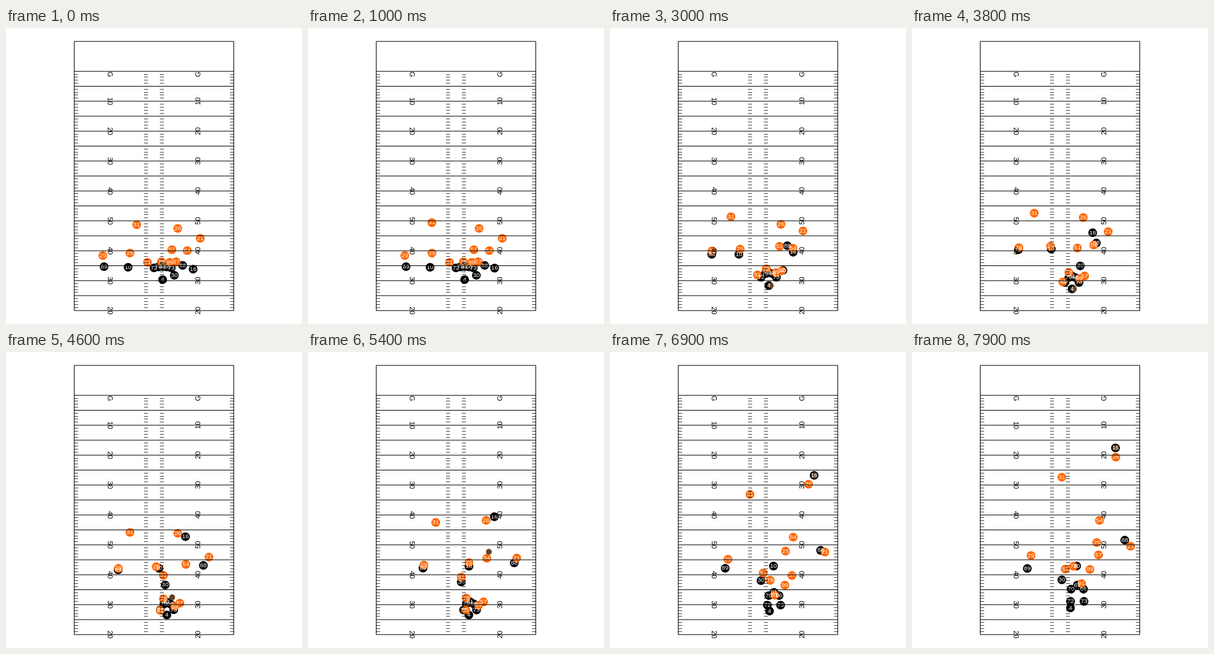
Animation of 480x480 px, one loop 8000 ms. Source, as an HTML page:

```html
<!DOCTYPE html>
<html lang="en">
<head>
<meta charset="utf-8">
<title>Play diagram</title>
<style>
  html, body { margin: 0; width: 100%; height: 100%; overflow: hidden; background: #fff; }
  svg { display: block; width: 100%; height: 100%; }
  text { font-family: "Liberation Sans", Arial, sans-serif; text-anchor: middle; }
  #lines { stroke: #000; stroke-width: 1.07; }
  #ticks { font-size: 11.04px; }
  #yards { font-size: 11.38px; }
  #numbers { font-size: 9.96px; fill: #fff; }
</style>
</head>
<body>
<svg viewBox="0 0 480 480">
  <g id="dots"></g>
  <g id="numbers"></g>
  <g id="ticks"></g>
  <g id="lines"></g>
  <g id="yards"></g>
</svg>
<script>
// The field is 90 by 53 1/3 yards, centred with a 5% margin.
const YARD = 480 / 1.1 / 90;
const TOP = 240 - 45 * YARD, BOTTOM = 240 + 45 * YARD, GOAL = TOP + 10 * YARD;
const LEFT = 240 - 80 / 3 * YARD, RIGHT = 240 + 80 / 3 * YARD;
const ORANGE = '#ff6600', BLACK = '#000', BROWN = '#654321';

// Times count steps of a tenth of a second.
const STEP = 100, STEPS = 80;
const HIKE = 14, CAUGHT = 19, THROW = 43, CATCH = 66;
const POCKET = [16, 50, 79], ROUTE = [16, 30, 54, 79], DEEP = [0, 19, 46, 69, 79];

const movers = [];

function add(layer, tag, attrs, label) {
  const el = document.createElementNS('http://www.w3.org/2000/svg', tag);
  for (const key in attrs) el.setAttribute(key, attrs[key]);
  if (label !== undefined) el.textContent = label;
  return document.getElementById(layer).appendChild(el);
}

const line = (x1, y1, x2, y2) => add('lines', 'line', { x1, y1, x2, y2 });

function drawTicks(y) {
  const inner = 3.3 * YARD;
  for (const x of [LEFT, 240 - inner]) add('ticks', 'text', { x, y: y - 1.6, style: 'text-anchor: start' }, '_');
  for (const x of [240 + inner, RIGHT]) add('ticks', 'text', { x, y: y - 1.6, style: 'text-anchor: end' }, '_');
}

function drawField() {
  line(LEFT, TOP, RIGHT, TOP);
  line(LEFT, TOP, LEFT, BOTTOM);
  line(RIGHT, TOP, RIGHT, BOTTOM);
  for (let yard = 0; yard <= 80; yard++) {
    const y = GOAL + yard * YARD;
    if (yard % 5) drawTicks(y);
    else line(LEFT, y, RIGHT, y);
    if (yard % 10) continue;
    const label = yard ? 50 - Math.abs(50 - yard) : 'G';
    const mid = yard ? y : y + YARD;
    for (const [x, turn] of [[LEFT + 12 * YARD, 90], [RIGHT - 12 * YARD, -90]]) {
      add('yards', 'text', { transform: `translate(${x} ${mid}) rotate(${turn})`, y: 4.07 }, label);
    }
  }
}

// Monotone cubic through the values v at the times t, held before the first.
function spline(t, v) {
  const slope = v.slice(1).map((b, i) => (b - v[i]) / (t[i + 1] - t[i]));
  const last = slope.length - 1;
  const tangent = v.map((_, i) => {
    if (i === 0) return slope[0];
    if (i > last) return slope[last];
    const a = slope[i - 1], b = slope[i];
    return a * b <= 0 ? 0 : 2 * a * b / (a + b);
  });
  return time => {
    if (time <= t[0]) return v[0];
    let i = 0;
    while (i < last && time > t[i + 1]) i++;
    const h = t[i + 1] - t[i], u = (time - t[i]) / h, w = 1 - u;
    return v[i] * (1 + 2 * u) * w * w + v[i + 1] * u * u * (3 - 2 * u)
      + h * u * w * (tangent[i] * w - tangent[i + 1] * u);
  };
}

function mover(color, r, position, label) {
  const parts = [add('dots', 'circle', { r, fill: color })];
  if (label) parts.push(add('numbers', 'text', { y: 2.6 }, label));
  movers.push({ parts, position });
  return position;
}

function player(color, number, times, ...points) {
  const x = spline(times, points.map(p => p[0]));
  const y = spline(times, points.map(p => p[1]));
  return mover(color, 7.1, time => [x(time), y(time)], number);
}

// The offensive line sets up straight, bends into a pocket, then opens upfield.
[72, 70, 61, 66, 73].forEach((number, i) => {
  const d = i - 2;
  player(BLACK, number, POCKET,
    [254 + 7 * d, 387 + d * d / 2],
    [262 + 5.3 * d, 406 + 3.2 * d * d],
    [268 + 12 * Math.sin(d), 378 + 6.6 * d * d]);
});

const passer = player(BLACK, 4, POCKET, [254, 408], [261, 427], [257, 415]);
const receiver = player(BLACK, 16, DEEP, [303.5, 391], [301.5, 387], [291, 299.5], [331, 200], [330, 155.5]);
player(BLACK, 89, ROUTE, [159, 387], [165, 367], [186.5, 350.5], [187, 351]);
player(BLACK, 10, ROUTE, [198, 388], [209, 367], [261, 347.5], [267, 347]);
player(BLACK, 88, ROUTE, [286.5, 385], [287.5, 353], [334.5, 342], [345, 305]);
player(BLACK, 30, ROUTE, [273, 401], [280.5, 393], [248.5, 373], [243, 369.5]);

player(ORANGE, 91, POCKET, [229.5, 380], [253, 420], [275, 375.5]);
player(ORANGE, 78, POCKET, [252, 379], [256, 401], [262, 347.5]);
player(ORANGE, 99, POCKET, [265.5, 380], [275, 413], [288.5, 352.5]);
player(ORANGE, 57, POCKET, [276, 379], [283, 408], [302.5, 329]);
player(ORANGE, 31, DEEP, [212, 319], [195, 312], [201, 292.5], [227, 231], [243, 203]);
player(ORANGE, 26, DEEP, [278.5, 325], [277, 325], [278.5, 294], [322, 214.5], [330.5, 170.5]);
player(ORANGE, 21, ROUTE, [315, 341], [313, 329], [338.5, 334], [354.5, 315]);
player(ORANGE, 29, ROUTE, [157, 369], [165.5, 361.5], [188, 345.5], [193, 330]);
player(ORANGE, 25, ROUTE, [201, 365], [211, 358.5], [261, 341.5], [299.5, 309]);
player(ORANGE, 51, ROUTE, [269, 359.5], [275, 354], [248.5, 365], [248.5, 352]);
player(ORANGE, 54, ROUTE, [294, 361], [296.5, 357], [290, 334.5], [304, 273]);

function fly(from, to, start, end, time) {
  const u = (time - start) / (end - start);
  return from.map((a, i) => a + (to[i] - a) * u);
}

// Ball: snapped to the passer, carried, thrown straight to the receiver.
function ball(time) {
  const spot = [254, 384];
  if (time < HIKE) return spot;
  if (time < CAUGHT) return fly(spot, passer(CAUGHT), HIKE, CAUGHT, time);
  if (time < THROW) {
    const [x, y] = passer(time);
    return [x + 3, y];
  }
  if (time < CATCH) return fly(passer(THROW), receiver(CATCH), THROW, CATCH, time);
  return receiver(time);
}
mover(BROWN, 4.8, ball);

function draw(now) {
  const time = Math.floor(now / STEP) % STEPS;
  for (const { parts, position } of movers) {
    const [x, y] = position(time);
    for (const part of parts) part.setAttribute('transform', `translate(${x.toFixed(2)} ${y.toFixed(2)})`);
  }
}

drawField();
let start;
function tick(now) {
  start ??= now;
  draw(now - start);
  requestAnimationFrame(tick);
}
draw(0);
requestAnimationFrame(tick);
</script>
</body>
</html>
```
